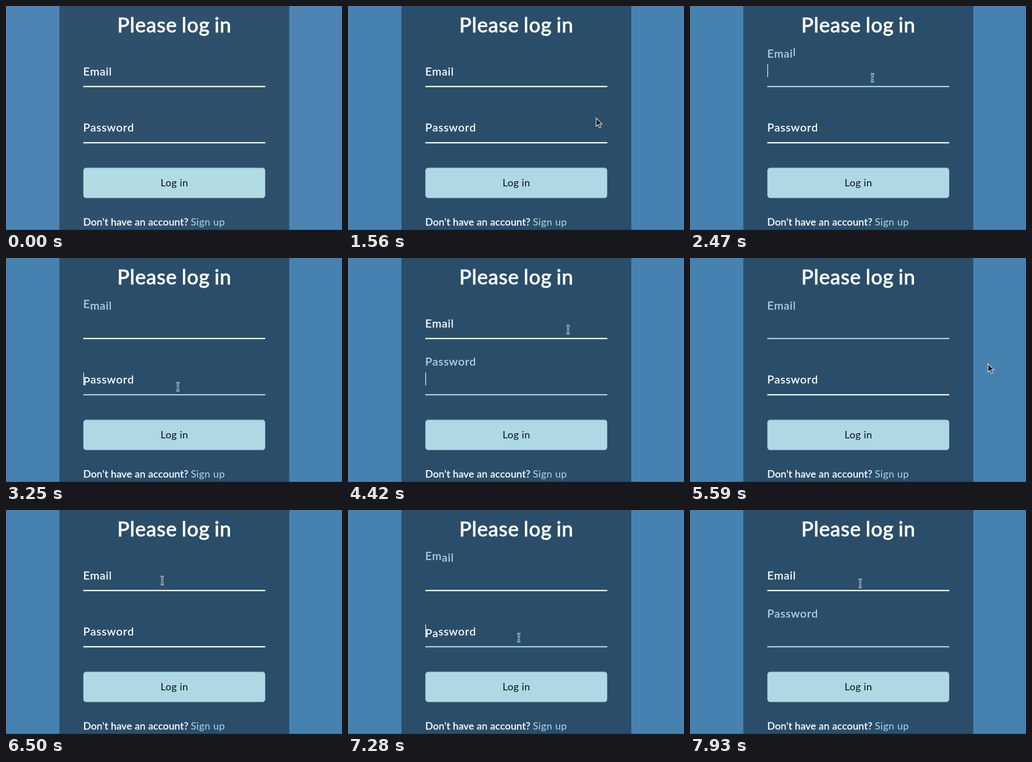
An HTML page that plays this animation: 600x400 px, repeating every 8000 ms.

```html
<!DOCTYPE html>
<html lang="en">
<head>
<meta charset="utf-8">
<title>Login form</title>
<style>
  html, body { margin: 0; width: 100%; height: 100%; overflow: hidden; }
  svg { display: block; width: 600px; height: 400px; }
  text {
    font: 18px Lato, "Open Sans", sans-serif;
    fill: #fff;
    stroke: #fff;
    stroke-width: .35px;
    letter-spacing: .15px;
    white-space: pre;
  }
  .title { font-size: 36px; letter-spacing: .9px; word-spacing: -2px; stroke-width: 1px; text-anchor: middle; }
  .label { font-size: 20px; letter-spacing: .75px; stroke-width: .3px; }
  .action { fill: #0b1218; stroke: none; letter-spacing: .4px; text-anchor: middle; }
  .link { fill: #add8e6; stroke: none; letter-spacing: .4px; }
</style>
</head>
<body>
<svg id="stage" viewBox="0 0 600 400">
  <rect id="page" width="600" height="400"/>
  <rect id="panel" x="95.3" width="410.5" height="400"/>
  <rect y="399" width="600" height="1" opacity=".2"/>
  <text class="title" x="300.8" y="47">Please log in</text>
  <g id="fields"></g>
  <rect id="button" x="138.5" y="289.2" width="324" height="53.4" rx="4.5" stroke="#9cc2cd"/>
  <text class="action" x="300.8" y="322">Log in</text>
  <text x="138" y="392">Don't have an account?</text>
  <text class="link" x="330" y="392">Sign up</text>
  <g id="cursor" stroke-linejoin="round">
    <path id="arrow" d="M0 0V15L3.6 11.8L6 17.5L8.6 16.4L6.2 10.9H11Z" fill="#15191d" stroke="#cfd8de" stroke-width="1.3"/>
    <g id="beam" fill="none">
      <path d="M-3 -7Q0 -7 0 -4.5Q0 -7 3 -7M0 -5V5M-3 7Q0 7 0 4.5Q0 7 3 7M-2 1H2" stroke="#dbe5eb" stroke-width="3"/>
      <path d="M-3 -7Q0 -7 0 -4.5Q0 -7 3 -7M0 -5V5M-3 7Q0 7 0 4.5Q0 7 3 7M-2 1H2" stroke="#20303c"/>
    </g>
  </g>
</svg>
<script>
const LOOP = 8000, STEP = 130, RISE = 32.5;
const $ = id => document.getElementById(id);

function add(parent, tag, attrs, content = '') {
  const node = document.createElementNS('http://www.w3.org/2000/svg', tag);
  for (const key in attrs) node.setAttribute(key, attrs[key]);
  node.textContent = content;
  return parent.appendChild(node);
}

// Each toggle alternately focuses and blurs the field.
function makeField(name, base, toggles) {
  const root = $('fields');
  const line = add(root, 'rect', { x: 138, y: base + 18.7, width: 325, height: 2.2 });
  const label = add(root, 'text', { class: 'label', x: 138, y: base });
  const letters = [...name].map(c => add(label, 'tspan', {}, c));
  const caret = add(root, 'rect', { x: 138, y: base - 20, width: 1.3, height: 23, fill: '#dce8ee' });
  return { base, toggles, line, letters, caret };
}

const fields = [
  makeField('Email', 124, [2000, 3220, 4700, 5790, 6600, 7200]),
  makeField('Password', 224.4, [3220, 4700, 7200])
];

// Time, x, y of the pointer's hot spot
const path = [
  [390, 525, 214], [520, 525, 214], [910, 526, 214], [1430, 526, 214],
  [1560, 443, 200], [1900, 330, 130], [2650, 325, 128], [3120, 307, 230],
  [3770, 307, 230], [4420, 393, 128], [5070, 390, 128], [5590, 532, 189],
  [5850, 532, 189], [6500, 279, 126], [6700, 279, 126], [7050, 305, 228],
  [7400, 305, 228], [7930, 304, 131]
];

const clamp = v => Math.max(0, Math.min(1, v));
const mix = (a, b, p) => a + (b - a) * p;
const bezier = (a, b, u) => 3 * u * (1 - u) ** 2 * a + 3 * u * u * (1 - u) * b + u ** 3;

// cubic-bezier(.68, -.55, .265, 1.55)
function backEase(x) {
  if (x <= 0 || x >= 1) return clamp(x);
  let lo = 0, hi = 1;
  for (let i = 0; i < 20; i++) {
    const mid = (lo + hi) / 2;
    if (bezier(.68, .265, mid) < x) lo = mid; else hi = mid;
  }
  return bezier(-.55, 1.55, lo);
}

function tint(p) {
  const c = clamp(p);
  return `rgb(${mix(255, 173, c)},${mix(255, 216, c)},${mix(255, 230, c)})`;
}

function drawField({ base, toggles, line, letters, caret }, t) {
  const past = toggles.filter(time => time <= t);
  const focused = past.length % 2 === 1;
  const age = past.length ? t - past[past.length - 1] : Infinity;
  letters.forEach((letter, i) => {
    const p = backEase((age - 50 * i) / 300);
    const up = past.length ? (focused ? p : 1 - p) : 0;
    letter.setAttribute('y', base - RISE * up);
    letter.style.fill = letter.style.stroke = tint(up);
  });
  line.setAttribute('fill', tint(focused ? 1 : 0));
  caret.setAttribute('visibility', focused && age % 1000 < 500 ? 'visible' : 'hidden');
}

function drawCursor(t) {
  const show = (id, on) => $(id).setAttribute('display', on ? 'inline' : 'none');
  show('cursor', t >= path[0][0]);
  let i = 0;
  while (i < path.length - 2 && path[i + 1][0] <= t) i++;
  const [a, b] = [path[i], path[i + 1]];
  const p = clamp((t - a[0]) / (b[0] - a[0]));
  const ease = p * p * (3 - 2 * p);
  const x = mix(a[1], b[1], ease), y = mix(a[2], b[2], ease);
  const overField = x > 138 && x < 463 && fields.some(f => y > f.base - 21 && y < f.base + 21);
  show('beam', overField);
  show('arrow', !overField);
  $('cursor').setAttribute('transform', `translate(${x} ${y})`);
}

function draw(time) {
  const t = Math.floor(time % LOOP / STEP) * STEP;
  const early = t < 390;
  $('page').setAttribute('fill', early ? '#4d84b4' : '#4682b0');
  $('panel').setAttribute('fill', early ? '#2f506c' : '#2a4e6a');
  $('button').setAttribute('fill', early ? '#b1dce4' : '#add8e4');
  fields.forEach(f => drawField(f, t));
  drawCursor(t);
}

const start = performance.now();
(function tick() {
  draw(performance.now() - start);
  requestAnimationFrame(tick);
})();
</script>
</body>
</html>
```
